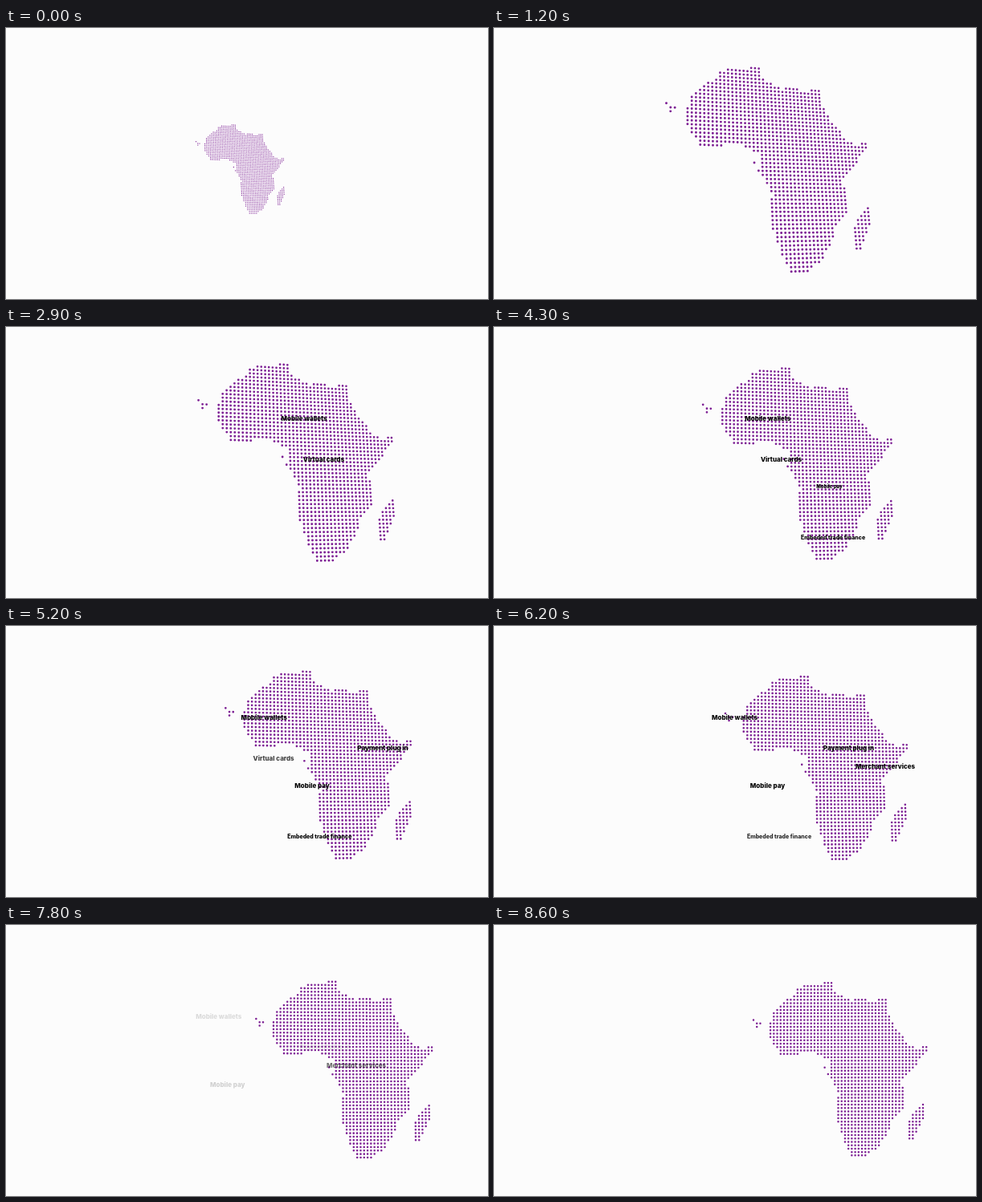
Recreate the animation shown at these times as an HTML page with a canvas. Size 600 by 338 pixels, loop 9 s.

```html
<!DOCTYPE html>
<html lang="en">
<head>
<meta charset="utf-8">
<title>Payment services map</title>
<style>
  html, body { margin: 0; width: 100%; height: 100%; overflow: hidden; background: #fcfcfc; }
  #stage { position: relative; width: 600px; height: 338px; overflow: hidden; }
  canvas { position: absolute; left: 0; top: 0; width: 600px; height: 338px; }
  span {
    position: absolute; left: 0; top: 0; white-space: nowrap; opacity: 0;
    font: 800 8px/1 Inter, "Open Sans", sans-serif; color: #000;
  }
  span.long { font-size: 7px; }
</style>
</head>
<body>
<div id="stage"><canvas id="map"></canvas></div>
<script>
const LOOP = 9000, LAST = 8600, STEP = 100, INTRO = 1150;
const COLS = 53, ROWS = 53, PITCH = 4.22, LEFT = 323, TOP = 71.8;
const PIVOT = { x: 440, y: 180 };

// Coast key points on the untilted map; the dot grid does the rest
const COAST = new Path2D(`M379 77 L391 74 423 70 424 84 446 95 450 89 474 95 478 90 489 90
  489 104 494 119 516 149 531 154 532 150 541 150 538 158 508 195 512 226 492 247
  492 256 476 279 462 289 444 289 433 261 426 240 429 208 417 187 417 168 395 157
  376 162 357 162 342 139 342 127 347 110 358 97 373 88Z
  M531 223 L537 223 538 236 523 266 517 266 514 257 518 240Z`);
const ISLETS = [[0, 11], [1, 12], [2, 12], [1, 13], [21, 25], [22, 27]];

// Labels pop in one after another and drift left; x is the centre at REF
const REF = 6200, FIRST = 1750, GAP = 750, POP = 400, FADE = 1150;
const LABELS = [
  { text: "Mobile wallets", x: 299.5, y: 114, speed: 21.7, leave: 6800 },
  { text: "Virtual cards", x: 306, y: 164.5, speed: 27.1, leave: 4900 },
  { text: "Embeded trade finance", x: 355, y: 262, speed: 35.3, leave: 6020 },
  { text: "Mobile pay", x: 340.5, y: 199, speed: 40.5, leave: 6850 },
  { text: "Payment plug in", x: 441.5, y: 151.5, speed: 27.5, leave: 6750 },
  { text: "Merchant services", x: 487, y: 174.5, speed: 31.9, leave: 7300 }
];

const stage = document.getElementById("stage");
const canvas = document.getElementById("map");
const ctx = canvas.getContext("2d");
const ratio = window.devicePixelRatio || 1;
canvas.width = 600 * ratio;
canvas.height = 338 * ratio;

const mix = (a, b, k) => a + (b - a) * k;
const progress = (t, from, to) => Math.max(0, Math.min(1, (t - from) / (to - from)));
const ease = (t, from, to) => (1 - Math.cos(Math.PI * progress(t, from, to))) / 2;

function makeDots() {
  const dots = [];
  const add = (x, y) => dots.push({ u: x - PIVOT.x, v: y - PIVOT.y });
  for (let row = 0; row < ROWS; row++) {
    for (let col = 0; col < COLS; col++) {
      const x = LEFT + col * PITCH, y = TOP + row * PITCH;
      if (ctx.isPointInPath(COAST, x, y)) add(x, y);
    }
  }
  ISLETS.forEach(([col, row]) => add(LEFT + col * PITCH, TOP + row * PITCH));
  return dots;
}
const dots = makeDots();

LABELS.forEach((label, i) => {
  label.enter = FIRST + GAP * i;
  label.el = document.createElement("span");
  label.el.textContent = label.text;
  label.el.classList.toggle("long", label.text.length > 18);
  stage.append(label.el);
});

// The map zooms in, then drifts right while its perspective tilt flattens out
function drawMap(t) {
  const grow = ease(t, 0, INTRO);
  const zoom = mix(0.436, 1, grow);
  const tilt = (LAST - Math.max(t, INTRO)) / 7400;
  const cx = mix(297.8, PIVOT.x - 82.6 * tilt, grow);
  const sway = 173.2 - 7.4 * Math.cos(Math.PI * (t - 2950) / 5200);
  const cy = mix(175.3, sway, ease(t, 850, 1500));
  const sx = 1 + 0.155 * tilt, sy = 1 + 0.1655 * tilt;

  ctx.setTransform(ratio, 0, 0, ratio, 0, 0);
  ctx.clearRect(0, 0, 600, 338);
  ctx.fillStyle = "#7d1f94";
  ctx.beginPath();
  for (const dot of dots) {
    const u = dot.u * zoom, v = dot.v * zoom;
    const depth = 1 + (0.000524 * u - 0.0005 * v) * tilt;
    const x = cx + (sx * u + 0.055 * tilt * v) / depth;
    const y = cy + (sy * v + 0.034 * tilt * u) / depth;
    const r = 1.25 * zoom * sx / depth;
    ctx.moveTo(x + r, y);
    ctx.arc(x, y, r, 0, 7);
  }
  ctx.fill();
}

function drawLabel({ el, x, y, speed, enter, leave }, t) {
  const left = x - speed * (t - REF) / 1000;
  const scale = progress(t, enter, enter + POP);
  el.style.opacity = t > enter ? 1 - progress(t, leave, leave + FADE) : 0;
  el.style.transform = `translate(${left}px, ${y}px) translate(-50%, -50%) scale(${scale})`;
}

const start = performance.now();
function frame() {
  const now = Math.max(0, performance.now() - start) % LOOP;
  const t = Math.min(LAST, Math.floor(now / STEP) * STEP);
  drawMap(t);
  LABELS.forEach(label => drawLabel(label, t));
  requestAnimationFrame(frame);
}
frame();
</script>
</body>
</html>
```
